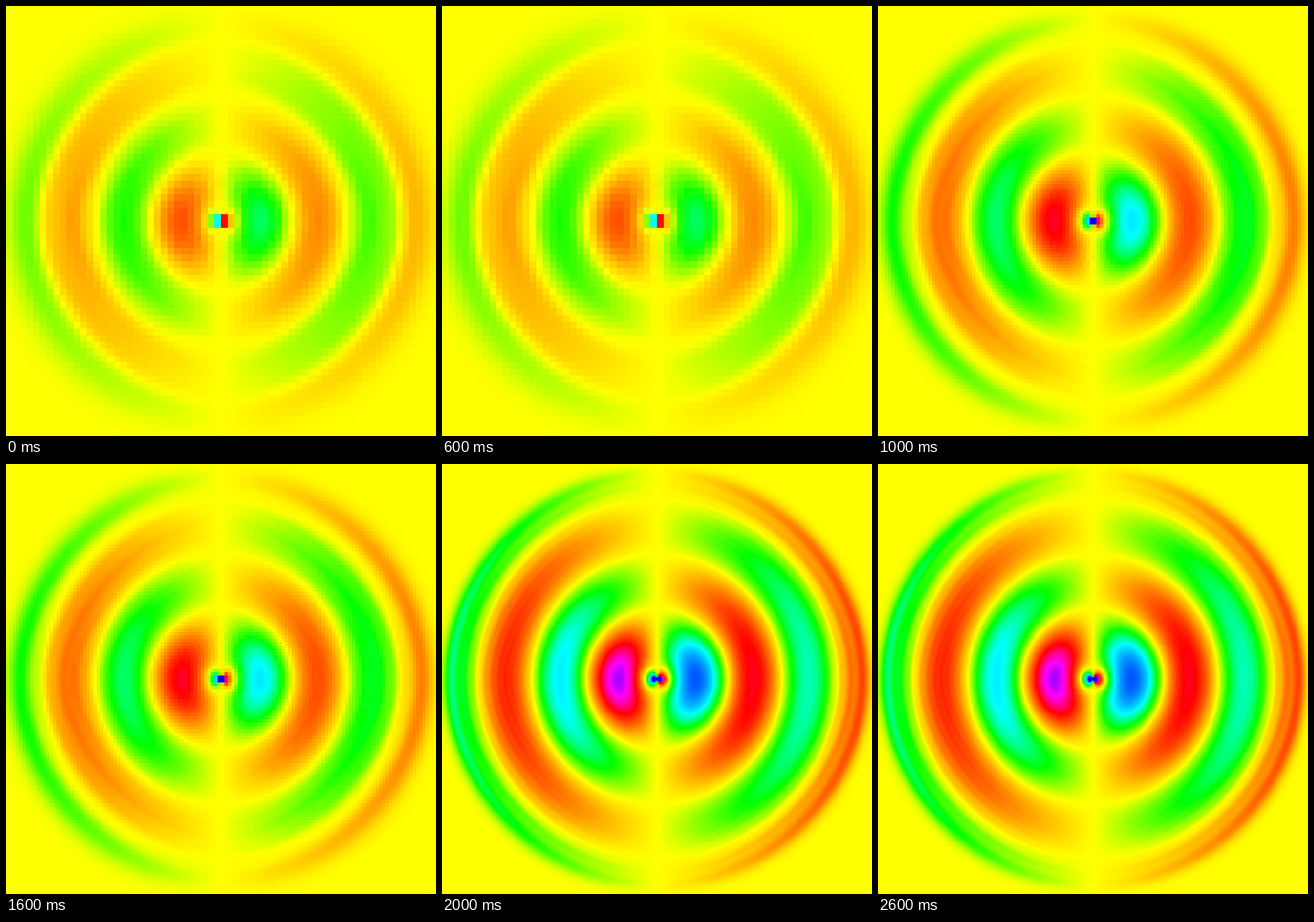
These frames come from a looping animation (748 px wide and 748 px high, 3000 ms). An HTML page with a canvas:

```html
<!DOCTYPE html>
<html lang="en">
<head>
<meta charset="utf-8">
<title>Dipole wave at three grid resolutions</title>
<style>
  html, body { margin: 0; width: 100%; height: 100%; overflow: hidden; background: #ff0; }
  canvas { display: block; }
</style>
</head>
<body>
<canvas id="stage" width="748" height="748"></canvas>
<script>
const SIZE = 748, HOLD = 1000;
const COURANT = 0.5;     // time step in units of cell / c
const WAVELENGTH = 0.25; // as a share of the stage width
const GRIDS = [
  { cells: 64, peak: 0.335 },
  { cells: 128, peak: 0.53 },
  { cells: 256, peak: 0.82 }
];
const STOPS = [
  [-1, 0, 0, 255], [-0.5, 0, 255, 255], [-0.25, 0, 255, 0], [0, 255, 255, 0],
  [0.5, 255, 0, 0], [0.75, 255, 0, 255], [1, 0, 0, 255]
];

function colour(v) {
  v = Math.max(-1, Math.min(1, v));
  let s = 1;
  while (s < STOPS.length - 1 && v > STOPS[s][0]) s++;
  const a = STOPS[s - 1], b = STOPS[s];
  const t = (v - a[0]) / (b[0] - a[0]);
  return [1, 2, 3].map(c => a[c] + (b[c] - a[c]) * t);
}

// Wave on bilinear square elements, driven at the central node.
// Only one quadrant is solved; the others follow by symmetry.
// Returns the transverse field at the element centres.
function solve(cells) {
  const half = cells / 2, n = half + 8;
  const omega = 2 * Math.PI / (WAVELENGTH * cells);
  const c2 = COURANT * COURANT / 3, steps = half / COURANT;
  let now = new Float64Array(n * n), old = new Float64Array(n * n);
  const field = new Float64Array(n * n);
  now[0] = 1;
  for (let step = 1; step <= steps; step++) {
    for (let j = 0; j < n - 1; j++) {
      const up = j ? -n : n;
      for (let i = 0; i < n - 1; i++) {
        const k = j * n + i, left = i ? -1 : 1;
        const u = now[k], a = k + up, b = k + n;
        field[k] += COURANT / 2 * (u - now[k + 1] + now[b] - now[b + 1]);
        const ring = now[k + left] + now[k + 1]
          + now[a + left] + now[a] + now[a + 1]
          + now[b + left] + now[b] + now[b + 1];
        old[k] = 2 * u - old[k] + c2 * (ring - 8 * u);
      }
    }
    [now, old] = [old, now];
    now[0] = Math.cos(omega * step * COURANT);
  }
  return { field, n };
}

function paint({ cells, peak }) {
  const { field, n } = solve(cells), half = cells / 2;
  // Scale by the mean strength of the innermost lobe.
  let sum = 0, count = 0;
  for (let i = Math.round(cells * 0.08); i <= cells * 0.105; i++, count++) sum += Math.abs(field[i]);
  const gain = peak * count / sum;

  const tile = document.createElement("canvas");
  tile.width = tile.height = cells;
  const ctx = tile.getContext("2d");
  const image = ctx.createImageData(cells, cells);
  for (let y = 0; y < cells; y++) {
    const j = y < half ? half - 1 - y : y - half;
    for (let x = 0; x < cells; x++) {
      const i = x < half ? half - 1 - x : x - half;
      const v = field[j * n + i] * gain * (x < half ? -1 : 1);
      image.data.set([...colour(v), 255], (y * cells + x) * 4);
    }
  }
  ctx.putImageData(image, 0, 0);
  return tile;
}

const ctx = document.getElementById("stage").getContext("2d");
const tiles = GRIDS.map(paint);
const start = performance.now();
let shown = -1;

function draw() {
  const index = Math.floor((performance.now() - start) / HOLD) % tiles.length;
  if (index !== shown) {
    shown = index;
    ctx.imageSmoothingEnabled = false;
    ctx.drawImage(tiles[index], 0, 0, SIZE, SIZE);
  }
  requestAnimationFrame(draw);
}
draw();
</script>
</body>
</html>
```
